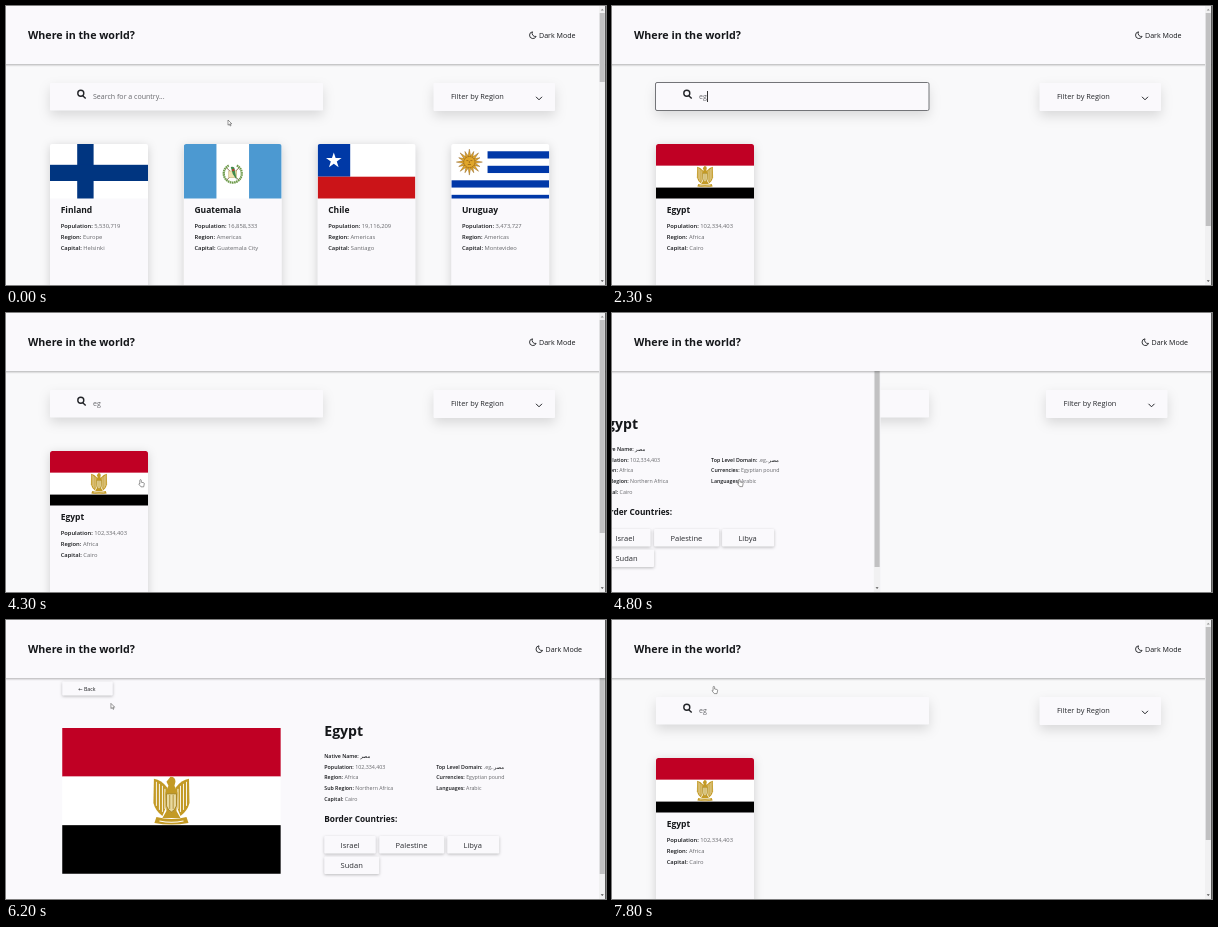
Animation of 600x279 px, one loop 8 s. Source, as an HTML page:

```html
<!DOCTYPE html>
<html lang="en">
<head>
<meta charset="utf-8">
<title>Where in the world?</title>
<style>
  html, body { margin: 0; width: 100%; height: 100%; overflow: hidden; background: #f9f9fa; }
  svg { display: block; width: 100%; height: 100%; }
  text { font-family: "Open Sans", "Noto Sans", "DejaVu Sans", sans-serif; }
  .surface { fill: #faf9fc; }
  .header { filter: drop-shadow(0 1px 1.3px rgba(0, 0, 0, .3)); }
  .field { filter: drop-shadow(0 5px 6px rgba(0, 0, 0, .13)); }
  .card { filter: drop-shadow(0 2px 5px rgba(0, 0, 0, .17)); }
  .button { filter: drop-shadow(0 1px 1.6px rgba(0, 0, 0, .25)); }
  .line { fill: none; stroke: #222428; }
</style>
</head>
<body>
<svg id="stage" viewBox="0 0 600 279" preserveAspectRatio="none"></svg>
<script>
const LOOP = 8000, BAR = 6.5;
const INK = '#15171a', MUTED = '#66676b';

// Markup helpers
const rect = (x, y, w, h, fill) => `<rect x="${x}" y="${y}" width="${w}" height="${h}" fill="${fill}"/>`;
const box = (kind, x, y, w, h, r = 1) =>
  `<rect class="surface ${kind}" x="${x}" y="${y}" width="${w}" height="${h}" rx="${r}"/>`;
const text = (x, y, size, content, weight = 400, fill = INK) =>
  `<text x="${x}" y="${y}" font-size="${size}" font-weight="${weight}" fill="${fill}">${content}</text>`;
const fact = (x, y, size, label, value) =>
  text(x, y, size, `${label}: <tspan font-weight="400" fill="${MUTED}">${value}</tspan>`, 600);
const group = (id, content, extra = '') => `<g id="${id}" ${extra}>${content}</g>`;
const at = (x, y, content, scale = 1) => `<g transform="translate(${x} ${y}) scale(${scale})">${content}</g>`;

function scrollbar(x, top, thumbTop, thumbEnd, id) {
  const mid = x + BAR / 2;
  return rect(x, top, BAR, 279 - top, '#f1f1f2') +
    `<rect id="${id}" x="${x + .7}" y="${thumbTop}" width="5.1" height="${thumbEnd - thumbTop}" fill="#c1c1c2"/>` +
    `<path d="M${mid - 1.5} 274.3h3l-1.5 1.8z" fill="#505050"/>` +
    (top ? '' : `<path d="M${mid - 1.5} 4.6h3l-1.5 -1.8z" fill="#909090"/>`);
}

// Flags are 98 wide, cropped at the bottom by the card
const bands = (height, colors) =>
  colors.map((c, i) => rect(0, i * height / 3, 98, height / 3, c)).join('');

function star(x, y, r) {
  const points = Array.from({ length: 10 }, (_, i) => {
    const a = i * Math.PI / 5, d = i % 2 ? r * .382 : r;
    return `${x + d * Math.sin(a)},${y - d * Math.cos(a)}`;
  });
  return `<polygon points="${points.join(' ')}" fill="#fff"/>`;
}

function sun(x, y) {
  const rays = Array.from({ length: 16 }, (_, i) =>
    `<path d="M-1.5 -5L0 -${i % 2 ? 11.5 : 13}L1.5 -5z" transform="rotate(${i * 22.5})"/>`).join('');
  return at(x, y, `<g fill="#e0a62b" stroke="#8a5a12" stroke-width=".4">${rays}<circle r="5.6"/></g>` +
    '<path d="M-3 -1.5h2M1 -1.5h2M-1.6 2.4h3.2M0 -1v2" stroke="#8a5a12" stroke-width=".7"/>');
}

const wing = `<path d="M-4 -13Q-10 -21 -17.5 -22L-18 2Q-16 10 -9 15L-5 5z"/>
  <path d="M-15 -19V5M-12 -17V9M-9 -15V11M-6.5 -12V8" stroke="#fff" stroke-width=".9"/>`;
const eagle = `<g fill="#c39a25">${wing}<g transform="scale(-1 1)">${wing}</g>
  <path d="M-1 -24Q4 -24 4 -19L3 -15 6 -8 5 10 9 17H-9L-5 10 -6 -8 -3 -15 -5 -19z"/>
  <path d="M-5 -7H5V5Q3 10 0 11Q-3 10 -5 5z" fill="#e8d9a0" stroke="#9b7817" stroke-width=".8"/>
  <path d="M-1.7 -6V8M1.7 -6V8" stroke="#a98420" stroke-width=".8"/>
  <path d="M-15 16Q0 20 15 16L17 22Q0 25 -17 22z"/>
  <path d="M-12 20Q0 22.5 12 20" fill="none" stroke="#fff" stroke-width="1"/></g>`;

const white = rect(0, 0, 98, 66, '#fff');
const flags = {
  Finland: white + rect(27.2, 0, 16.4, 60, '#003580') + rect(0, 20.8, 98, 16.2, '#003580'),
  Guatemala: white + rect(0, 0, 32.7, 62, '#4c99d1') + rect(65.3, 0, 32.7, 62, '#4c99d1') +
    at(49, 30, `<path d="M-4 -8.5A9 9 0 1 0 4 -8.5" fill="none" stroke="#6d9a4a" stroke-width="2.3" stroke-dasharray="1.6 .5"/>
      <path d="M-6 6L6 -6M6 6L-6 -6" stroke="#8b7355" stroke-width="1"/>
      <rect x="-4" y="-3" width="8" height="6.5" fill="#efe3ae" stroke="#b9a56a" stroke-width=".5"/>
      <path d="M-2 -7Q2 -8 2 -4L4 6 0 0z" fill="#3f8a4c"/><circle cx=".5" cy="-4" r="1.2" fill="#c0392b"/>`),
  Chile: white + rect(0, 0, 32.7, 32.7, '#0039a6') + rect(0, 32.7, 98, 33, '#cb1418') + star(16.3, 16.6, 8.2),
  Uruguay: white + [1, 3, 5, 7].map(i => rect(i < 5 ? 36.3 : 0, i * 7.26, 98, 7.26, '#0038a8')).join('') + sun(18.1, 18.1),
  Egypt: bands(65.4, ['#c00024', '#fff', '#000']) + at(49, 32.7, eagle, .45),
  Estonia: bands(62, ['#0072ce', '#000', '#fff']),
  'El Salvador': bands(56, ['#0f47af', '#fff', '#0f47af']),
  Ethiopia: bands(54.5, ['#078930', '#fcdd09', '#da121a']) + '<circle cx="49" cy="27" r="13" fill="#0f47af"/>',
};

function card(column, name, population, region, capital) {
  return at(44 + column * 133.75, 138,
    box('card', 0, 0, 98, 160, 2.5) +
    `<g clip-path="url(#flagClip)">${flags[name]}</g>` +
    text(10.7, 69, 8.5, name, 700) +
    fact(10.7, 83.5, 5.8, 'Population', population) +
    fact(10.7, 95.1, 5.8, 'Region', region) +
    fact(10.7, 106.4, 5.8, 'Capital', capital));
}

const egypt = ['Egypt', '102,334,403', 'Africa', 'Cairo'];
const lists = {
  all: [['Finland', '5,530,719', 'Europe', 'Helsinki'], ['Guatemala', '16,858,333', 'Americas', 'Guatemala City'],
    ['Chile', '19,116,209', 'Americas', 'Santiago'], ['Uruguay', '3,473,727', 'Americas', 'Montevideo']],
  some: [['Estonia', '1,331,057', 'Europe', 'Tallinn'], ['El Salvador', '6,486,201', 'Americas', 'San Salvador'],
    egypt, ['Ethiopia', '114,963,583', 'Africa', 'Addis Ababa']],
  one: [egypt],
};
const cards = Object.entries(lists)
  .map(([id, list]) => group(id, list.map((c, i) => card(i, ...c)).join(''))).join('');

const button = (x, y, w, label) => box('button', x, y, w, 17.6) + text(x + 16.3, y + 11.7, 7.55, label, 500, '#2b2d31');
const details = [
  box('button', 53, 61.5, 50.5, 14), text(69, 70.6, 5.2, '← Back', 500),
  at(53, 108, flags.Egypt, 218.4 / 98),
  text(315, 116.4, 14.1, 'Egypt', 700),
  fact(315, 137.9, 5.25, 'Native Name', `<tspan fill="${INK}">مصر</tspan>`),
  fact(315, 148.5, 5.35, 'Population', '102,334,403'),
  fact(315, 159.3, 5.25, 'Region', 'Africa'),
  fact(315, 170, 5.25, 'Sub Region', 'Northern Africa'),
  fact(315, 180.8, 5.25, 'Capital', 'Cairo'),
  fact(427, 148.5, 5.25, 'Top Level Domain', `.eg,.<tspan fill="${INK}">مصر</tspan>`),
  fact(427, 159.3, 5.25, 'Currencies', 'Egyptian pound'),
  fact(427, 170, 5.25, 'Languages', 'Arabic'),
  text(315, 202.3, 8.3, 'Border Countries:', 700),
  button(315, 216, 51.5, 'Israel'), button(370, 216, 65, 'Palestine'),
  button(438, 216, 52, 'Libya'), button(315, 236.4, 55, 'Sudan'),
].join('');

const stage = document.getElementById('stage');
stage.innerHTML =
  `<clipPath id="flagClip"><path d="M0 54.5V2.5Q0 0 2.5 0H95.5Q98 0 98 2.5V54.5z"/></clipPath>` +
  rect(0, 0, 600, 279, '#f9f9fa') + cards +
  box('field', 44, 77, 273, 27.5) +
  '<rect id="focus" class="line" x="43.5" y="76.5" width="273.5" height="28" rx="1.5" style="stroke:#737478"/>' +
  '<path class="line" stroke-width="1.4" d="M77 90l2.7 2.6M77.8 87.3a3 3 0 1 1 -6 0a3 3 0 1 1 6 0"/>' +
  text(87, 93.3, 7.05, '<tspan id="query"></tspan>', 400, MUTED) +
  '<rect id="caret" y="85" width="1" height="11" fill="#333"/>' +
  group('filter', box('field', 427.5, 77, 121.5, 28) +
    text(445, 93.4, 7.4, 'Filter by Region', 500, '#26282c') +
    '<path class="line" d="M530 90.8l3 3 3 -3"/>') +
  group('panel', '<rect id="sheet" class="surface" y="50" height="229"/>' + group('details', details) +
    group('panelBar', scrollbar(593 - BAR, 50, 56, 254, 'panelThumb'))) +
  box('header', -10, -10, 620, 68, 0) +
  text(22, 33, 10.7, 'Where in the world?', 700) +
  group('mode', text(533, 32, 7.1, 'Dark Mode', 500) +
    '<path class="line" stroke-width=".9" d="M526.5 25.8a3.4 3.4 0 1 0 3.6 4.6a3.2 3.2 0 0 1 -3.6 -4.6z"/>') +
  group('pageBar', scrollbar(593, 0, 7, 76, 'pageThumb')) +
  rect(599.2, 0, .8, 279, '#333') +
  group('pointer', [
    group('arrow', '<path d="M0 0V5.2L1.3 4.1 2.2 6 3 5.6 2.2 3.8H3.8z"/>'),
    group('hand', '<path d="M1.3 .4Q2.1 .4 2.1 1.2V3L4.6 3.5Q5.2 3.7 5.1 4.6L4.5 7.6H1.8L-.5 4.8Q-.2 4 .6 4.6V1.2Q.6 .4 1.3 .4z"/>'),
    group('beam', '<path d="M-1 -3.5H1M0 -3.5V3.5M-1 3.5H1"/>'),
  ].join(''), 'fill="#fff" stroke="#555" stroke-width=".6"');

const el = {};
stage.querySelectorAll('[id]').forEach(node => el[node.id] = node);
const show = (node, on) => node.setAttribute('visibility', on ? 'visible' : 'hidden');
const move = (node, x, y = 0) => node.setAttribute('transform', `translate(${x} ${y})`);

// cubic-bezier(.25, .1, .25, 1), solved by bisection
function ease(x) {
  if (x <= 0) return 0;
  if (x >= 1) return 1;
  const curve = (a, b, s) => 3 * a * s * (1 - s) ** 2 + 3 * b * s * s * (1 - s) + s ** 3;
  let low = 0, high = 1;
  for (let i = 0; i < 20; i++) {
    const mid = (low + high) / 2;
    if (curve(.25, .25, mid) < x) low = mid; else high = mid;
  }
  return curve(.1, 1, low);
}

// start, end, x, y of each pointer move
const moves = [[50, 400, 180, 91], [2950, 3200, 210, 169], [3850, 4400, 126, 166], [5650, 6400, 100.5, 66]];
function pointerAt(t) {
  let x = 222, y = 114;
  for (const [start, end, toX, toY] of moves) {
    const k = Math.min(1, Math.max(0, (t - start) / (end - start))), p = k * k * (3 - 2 * k);
    x += (toX - x) * p;
    y += (toY - y) * p;
  }
  return [x, y];
}

function draw(t) {
  const within = (from, to) => t >= from && t < to;

  // Search
  const focused = within(600, 3400);
  const blink = within(600, 1200) || within(1700, 2800) || within(3300, 3400);
  const query = t < 2000 ? '' : t < 2300 ? 'e' : 'eg';
  el.query.textContent = query || 'Search for a country...';
  show(el.focus, focused);
  show(el.caret, blink);
  el.caret.setAttribute('x', 87 + [0, 4, 8][query.length]);
  show(el.all, query === '');
  show(el.some, query === 'e');
  show(el.one, query === 'eg');
  el.pageThumb.setAttribute('height', { '': 69, e: 140, eg: 213 }[query]);

  // Detail panel; the page scrollbar is gone while it is open
  const open = within(4600, 7300);
  const wide = open ? BAR : 0;
  const shown = t < 7300 ? ease((t - 4600) / 750) : 1 - ease((t - 7300) / 500);
  show(el.pageBar, !open);
  move(el.mode, wide);
  move(el.filter, wide);
  show(el.panel, shown > 0);
  move(el.panel, -(593 + wide) * (1 - shown));
  move(el.details, wide / 2);
  move(el.panelBar, wide);
  el.sheet.setAttribute('width', 593 + wide);

  // Pointer
  const [x, y] = pointerAt(t);
  const visible = !within(600, 2950);
  const beam = t < 3200 && y > 76 && y < 105;
  const hand = (within(3900, 5700) && x < 142) || (t > 5700 && y < 75);
  move(el.pointer, x, y);
  show(el.beam, visible && beam);
  show(el.hand, visible && hand);
  show(el.arrow, visible && !beam && !hand);
}

const begin = performance.now();
function tick() {
  draw((performance.now() - begin) % LOOP);
  requestAnimationFrame(tick);
}
tick();
</script>
</body>
</html>
```
